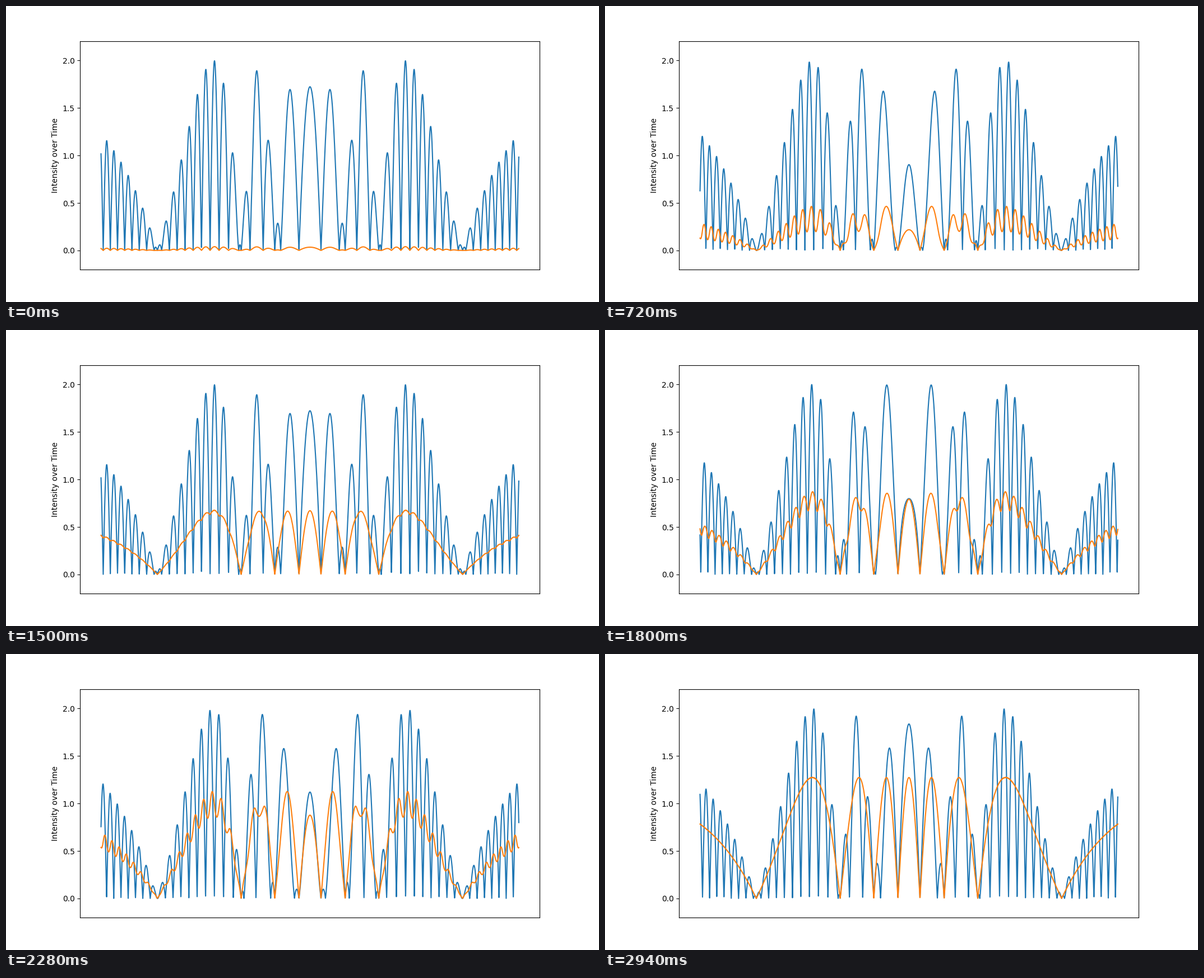
A matplotlib script that plays this animation: 1058x529 px, repeating every 3 s.

```python
import numpy as np
import matplotlib.pyplot as plt
from matplotlib.animation import FuncAnimation

FRAMES = 50
INTERVAL = 60

K = 5.0                       # wave number
WAVELENGTH = 2 * np.pi / K
HALF_GAP = 2 * WAVELENGTH     # each emitter sits this far from the centre
SCREEN = 7.99                 # distance from emitters to screen

x = np.arange(-20, 20, 0.01)
r1 = np.hypot(x + HALF_GAP, SCREEN)
r2 = np.hypot(x - HALF_GAP, SCREEN)


def intensity(i):
    """Absolute sum of both waves along the screen at step i."""
    phase = 2 * np.pi * i / FRAMES
    return np.abs(np.sin(K * r1 - phase) + np.sin(K * r2 - phase))


waves = np.array([intensity(i) for i in range(FRAMES)])
totals = np.cumsum(waves, axis=0) / FRAMES

fig, ax = plt.subplots(figsize=(10.58, 5.29), dpi=100)
wave_line, = ax.plot(x, waves[0], color="tab:blue", lw=1.5)
total_line, = ax.plot(x, totals[0], color="tab:orange", lw=1.5)
ax.set_ylim(-0.2, 2.2)
ax.set_xticks([])
ax.set_ylabel("Intensity over Time")


def update(i):
    wave_line.set_ydata(waves[i])
    total_line.set_ydata(totals[i])
    return wave_line, total_line


def reset():
    return update(0)


anim = FuncAnimation(fig, update, frames=FRAMES, init_func=reset,
                     interval=INTERVAL, repeat=True, repeat_delay=0)
plt.show()
```
